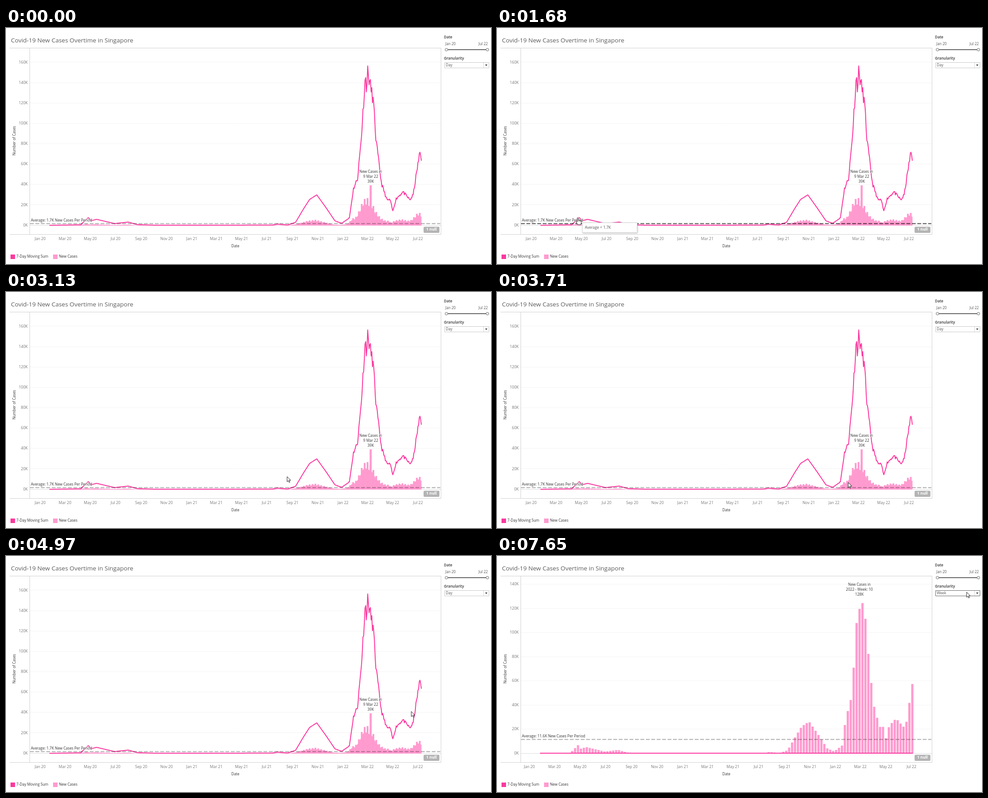
Animation, 1072 px wide and 523 px high, one loop 8000 ms. Source, as an HTML page with a canvas:

```html
<!DOCTYPE html>
<html lang="en">
<head>
<meta charset="utf-8">
<title>Covid-19 New Cases</title>
<style>
  html, body { margin: 0; width: 100%; height: 100%; overflow: hidden; background: #fff; }
  canvas { display: block; }
</style>
</head>
<body>
<canvas id="stage" width="1072" height="523"></canvas>
<script>
const ctx = document.getElementById('stage').getContext('2d');
const LOOP = 8000, WEEK_AT = 7240, BASE = 437.5;
const HOT = '#fc389f', SOFT = '#ff9bcf';
const FONT = '"Open Sans", "Noto Sans", sans-serif';

const VIEWS = {
  day: { perK: 2.2563, top: 160, x0: 75.5, perDay: .9156, average: '1.7K', avgY: 433.5,
    peak: [806, 319, 'New Cases in', '9 Mar 22', '39K'], unit: 'Day' },
  week: { perK: 2.675, top: 140, x0: 71.5, perDay: .926, average: '11.6K', avgY: 406.5,
    peak: [801, 64, 'New Cases in', '2022 - Week: 10', '128K'], unit: 'Week' }
};

// Turning points of the 7-day sum: x in the day view, thousands of cases
const turns = [
  [96, .1], [165, .6], [182, 7.8], [188, 4.5], [200, 6], [240, 1.8], [270, 3.3], [290, .8],
  [330, .2], [588, .3], [600, 1.3], [622, .4], [640, 3], [658, 16.5], [671, 25.5], [687, 30],
  [708, 17], [727, 4.5], [742, 2], [759, 7.5], [768, 36], [777, 46], [785, 84], [794, 145],
  [797.5, 135], [799, 152], [812, 122], [818, 83], [830, 41], [842, 25], [849, 25], [855, 14],
  [862, 26], [877, 33], [893, 25], [900, 30], [909, 56], [915, 72], [919, 63]];

// Pointer path: time, x, y
const pointerPath = [
  [390, 1044, 520], [580, 1036, 481], [730, 1036, 481], [830, 1045, 509], [1510, 251, 437],
  [1680, 178, 420], [2440, 298, 428], [3130, 621, 409], [3800, 800, 424], [4030, 790, 424],
  [4280, 879, 411], [4810, 856, 424], [5630, 1059, 19], [6230, 1058, 80], [6500, 1058, 86],
  [7040, 1048, 104], [7210, 1048, 104], [7650, 1038, 80]];

function interpolate(keys, at, column = 1) {
  const i = keys.findIndex(key => key[0] >= at);
  if (i < 0) return keys[keys.length - 1][column];
  if (i === 0) return keys[0][column];
  const a = keys[i - 1], b = keys[i];
  return a[column] + (b[column] - a[column]) * (at - a[0]) / (b[0] - a[0]);
}

function seeded(seed) {
  return () => (seed = seed * 16807 % 2147483647) / 2147483647;
}

const movingSum = x => interpolate(turns, x);

// The last year is visibly jagged, the earlier waves are smooth
const sumLine = [];
const random = seeded(11);
for (let x = 96; x <= 919; x += 1.5) {
  const jitter = x > 750 ? (random() - .5) * .1 : 0;
  sumLine.push([x, BASE - movingSum(x) * (1 + jitter) * VIEWS.day.perK]);
}

function text(str, x, y, { size = 8.1, color = '#333', align = 'left', weight = 400, halo = false } = {}) {
  ctx.font = `${weight} ${size}px ${FONT}`;
  ctx.textAlign = align;
  ctx.textBaseline = 'middle';
  if (halo) {
    ctx.strokeStyle = 'rgba(255,255,255,.6)';
    ctx.lineWidth = 2;
    ctx.strokeText(str, x, y);
  }
  ctx.fillStyle = color;
  ctx.fillText(str, x, y);
}

function rect(x, y, w, h, color) {
  ctx.fillStyle = color;
  ctx.fillRect(x, y, w, h);
}

function bar(x, width, height) {
  rect(x - width / 2, BASE - height, width, height, SOFT);
}

function dot(x, y, radius, fill, border) {
  ctx.beginPath();
  ctx.arc(x, y, radius, 0, 7);
  ctx.fillStyle = fill;
  ctx.fill();
  if (!border) return;
  ctx.strokeStyle = border;
  ctx.lineWidth = 1;
  ctx.stroke();
}

function polyline(points, color, width) {
  ctx.beginPath();
  points.forEach(([x, y]) => ctx.lineTo(x, y));
  ctx.strokeStyle = color;
  ctx.lineWidth = width;
  ctx.lineJoin = 'round';
  ctx.stroke();
}

const line = (x1, y1, x2, y2, color, width = 1) => polyline([[x1, y1], [x2, y2]], color, width);

function box(x, y, w, h, border, shadow) {
  ctx.save();
  if (shadow) {
    ctx.shadowColor = 'rgba(0,0,0,.35)';
    ctx.shadowBlur = 3;
    ctx.shadowOffsetX = ctx.shadowOffsetY = 1;
  }
  rect(x, y, w, h, '#fff');
  ctx.restore();
  ctx.strokeStyle = border;
  ctx.lineWidth = 1;
  ctx.strokeRect(x + .5, y + .5, w - 1, h - 1);
}

function drawAxes(view) {
  for (let k = 0; k <= view.top; k += 20) {
    const y = BASE - k * view.perK;
    line(53, Math.round(y) - .5, 962, Math.round(y) - .5, k ? '#f4f4f4' : '#dcdcdc');
    text(k + 'K', 48, y, { size: 8.5, color: '#777', align: 'right' });
  }
  for (let m = 0; m <= 30; m += 2) {
    const days = (Date.UTC(2020, m) - Date.UTC(2020, 0)) / 864e5;
    const name = ['Jan', 'Mar', 'May', 'Jul', 'Sep', 'Nov'][m % 12 / 2];
    text(`${name} ${20 + Math.floor(m / 12)}`, view.x0 + days * view.perDay, 467.5,
      { size: 8.5, color: '#777', align: 'center' });
  }
  for (const y of [44.5, 457.5]) line(8, y, 962, y, '#d0d0d0');
  for (const x of [52.5, 961.5]) line(x, 44, x, 458, '#d0d0d0');
}

function drawDays() {
  const { perDay, perK } = VIEWS.day;
  for (let x = 96, day = 0; x < 917; x += perDay, day++) {
    const weekday = day % 7 === 5 ? 1.3 : .95;
    bar(x, 4, movingSum(x + 3) / 7 * weekday * perK);
  }
  bar(806, 4.6, 39.4 * perK);
  polyline(sumLine, HOT, 2);
}

function drawWeeks() {
  const { day, week } = VIEWS;
  for (let x = 918; x > 96; x -= week.perDay * 7) {
    const date = (x - week.x0) / week.perDay;
    bar(x, 5, movingSum(day.x0 + date * day.perDay) * .88 * week.perK);
  }
  line(95, 437, 919, 437, HOT, 2);
}

function drawAverage(view, active) {
  ctx.setLineDash([8.5, 3.5]);
  line(53, view.avgY, 960, view.avgY, active ? 'rgba(0,0,0,.68)' : 'rgba(0,0,0,.32)', 2);
  ctx.setLineDash([]);
  text(`Average: ${view.average} New Cases Per Period`, 55, view.avgY - 7, { halo: true });
}

function drawLabels(view) {
  text('Covid-19 New Cases Overtime in Singapore', 11, 28, { size: 13.5, color: '#5c5c5c' });
  const [px, py, ...rows] = view.peak;
  rows.forEach((row, i) => text(row, px, py + i * 11, { align: 'center', halo: true }));
  text('Date', 507, 483.5, { align: 'center', weight: 500 });
  ctx.save();
  ctx.translate(18.5, 250);
  ctx.rotate(-Math.PI / 2);
  text('Number of Cases', 0, 0, { align: 'center', weight: 500 });
  ctx.restore();
  rect(10, 502, 10, 10, HOT);
  text('7-Day Moving Sum', 23, 507);
  rect(104, 502, 10, 10, SOFT);
  text('New Cases', 117, 507);
  ctx.fillStyle = '#b4b4b4';
  ctx.beginPath();
  ctx.roundRect(923, 440.5, 35, 13.5, 2);
  ctx.fill();
  text('1 null', 940.5, 447, { size: 8.5, color: '#fff', align: 'center', weight: 700 });
}

function drawControls(view, hover, open, pointerY) {
  text('Date', 968, 20.5, { weight: 600 });
  text('Jan 20', 971, 36, { color: '#555' });
  text('Jul 22', 1065, 36, { color: '#555', align: 'right' });
  line(974, 48, 1064, 48, '#666', 2);
  for (const x of [973.5, 1064]) dot(x, 48, 3, '#fff', '#666');
  text('Granularity', 968, 67.5, { weight: 600 });
  box(969, 76, 99, 13, hover ? '#666' : '#c8c8c8');
  line(1055.5, 77, 1055.5, 88, '#d8d8d8');
  text(view.unit, 972, 82.5, { color: '#555' });
  ctx.fillStyle = '#222';
  ctx.fill(new Path2D('M1059 81H1064L1061.5 84Z'));
  if (!open) return;
  box(969, 89, 99, 36, '#bbb', true);
  ['Day', 'Week', 'Month'].forEach((name, i) => {
    const y = 90 + i * 11.5;
    if (pointerY >= y && pointerY < y + 11.5) rect(970, y, 97, 11.5, '#e6e6e6');
    text(name, 972, y + 6, { color: '#555' });
  });
}

const ARROW = new Path2D('M0 0V11.5L2.7 9L4.5 13L6.3 12.2L4.5 8.3H8Z');
const HAND = new Path2D('M-1 1Q.2-.6 1.4 1V6Q3 4.8 3.8 6.3Q5.2 5.4 6 7Q7.6 6.4 8 8V12L6.7 16H.3L-3 10Q-3.2 8-1 9.4Z');

function drawPointer(x, y, hand) {
  const shape = hand ? HAND : ARROW;
  ctx.save();
  ctx.translate(x, y);
  ctx.fillStyle = '#fff';
  ctx.fill(shape);
  ctx.strokeStyle = '#222';
  ctx.lineWidth = 1;
  ctx.stroke(shape);
  if (hand) for (const finger of [1.4, 3.8, 6]) line(finger, 6.5, finger, 9, '#222', .7);
  ctx.restore();
}

function draw(t) {
  const within = (from, to) => t >= from && t < to;
  const view = t < WEEK_AT ? VIEWS.day : VIEWS.week;
  const x = interpolate(pointerPath, t, 1), y = interpolate(pointerPath, t, 2);
  const overMark = within(2390, 2520), overAverage = within(1560, 2390);
  const tip = overMark || overAverage;

  rect(0, 0, 1072, 523, '#fff');
  drawAxes(view);
  view === VIEWS.day ? drawDays() : drawWeeks();
  drawAverage(view, overAverage);
  drawLabels(view);
  drawControls(view, t >= 6170, within(6320, 7040), y);
  if (overMark) dot(291.5, 436, 2.2, '#f0287f');
  if (tip) {
    box(x + 10, y + 11, 122, 23, '#d0d0d0', true);
    text('Average = 1.7K', x + 16, y + 22.5, { size: 8.4, color: '#555' });
  }
  if (t >= 390) drawPointer(x, y, tip);
}

function frame() {
  draw(performance.now() % LOOP);
  requestAnimationFrame(frame);
}
frame();
</script>
</body>
</html>
```
